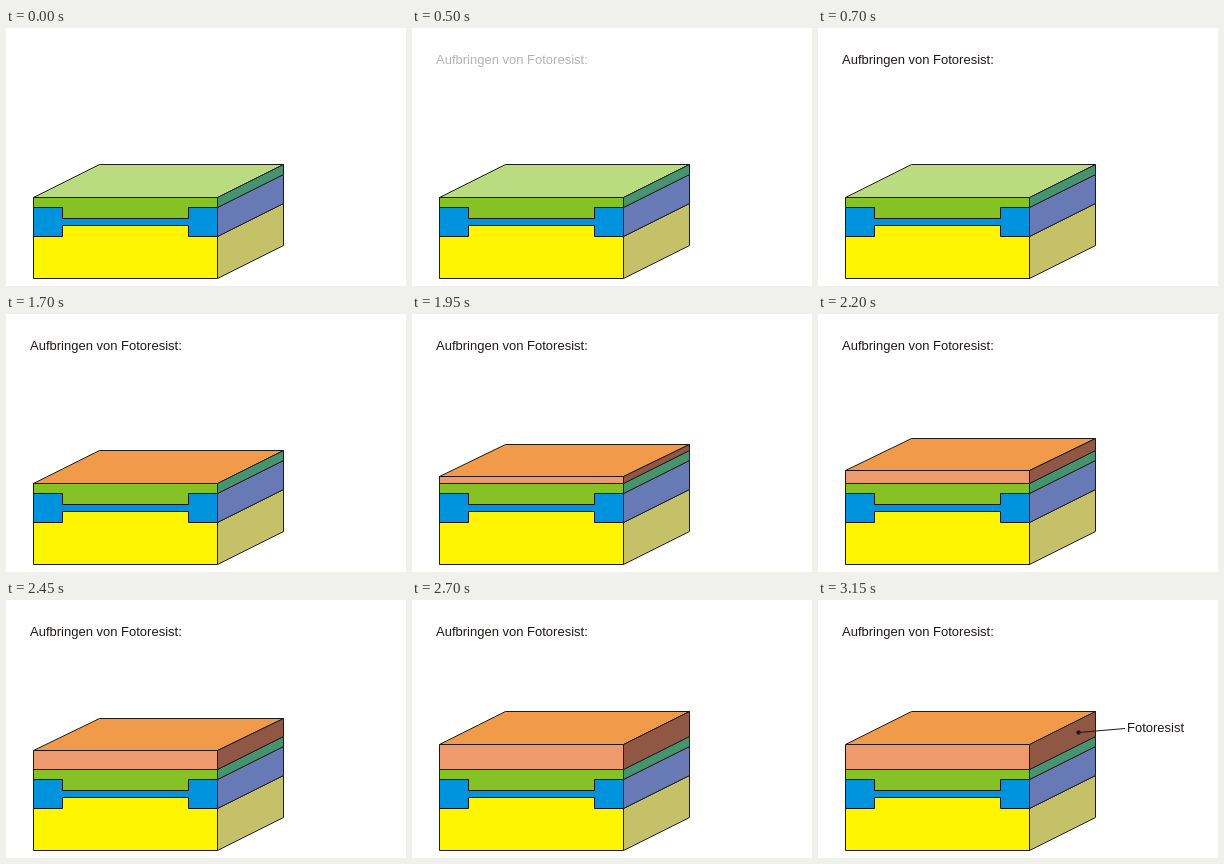
Animation, 400 px wide and 258 px high, one loop 5150 ms. Source, as an HTML page with a canvas:

```html
<!DOCTYPE html>
<html lang="de">
<head>
<meta charset="utf-8">
<title>Aufbringen von Fotoresist</title>
<style>
  html, body { margin: 0; width: 100%; height: 100%; overflow: hidden; background: #fff; }
  canvas { display: block; width: 400px; height: 258px; }
</style>
</head>
<body>
<canvas id="stage" width="400" height="258"></canvas>
<script>
const ctx = document.getElementById('stage').getContext('2d');
const LOOP = 5150;
const INK = '#1f1a17';
const LEFT = 27, RIGHT = 211, BACK_LEFT = 93, BACK_RIGHT = 277;

// Height of the top face's front and back edges as the resist grows
const FRONT_TOP = [169, 162, 156, 150, 144];
const BACK_TOP = [136, 130, 124, 118, 111];

function polygon(fill, ...points) {
  ctx.beginPath();
  for (const [x, y] of points) ctx.lineTo(x + 0.5, y + 0.5);
  ctx.closePath();
  ctx.fillStyle = fill;
  ctx.fill();
  ctx.stroke();
}

function frontFace(fill, top, bottom) {
  polygon(fill, [LEFT, top], [RIGHT, top], [RIGHT, bottom], [LEFT, bottom]);
}

function sideFace(fill, top, bottom, backTop, backBottom) {
  polygon(fill, [RIGHT, top], [BACK_RIGHT, backTop], [BACK_RIGHT, backBottom], [RIGHT, bottom]);
}

function drawBlock(level, coated) {
  const front = FRONT_TOP[level], back = BACK_TOP[level];
  ctx.strokeStyle = INK;
  ctx.lineWidth = 1;
  ctx.lineJoin = 'round';

  polygon(coated ? '#f09a4a' : '#badb7f',
    [LEFT, front], [BACK_LEFT, back], [BACK_RIGHT, back], [RIGHT, front]);

  sideFace('#c5c168', 208, 250, 175, 217);
  sideFace('#677ab5', 179, 208, 146, 175);
  sideFace('#45936f', 169, 179, 136, 146);

  frontFace('#fff500', 169, 250);
  polygon('#84c225', [LEFT, 169], [RIGHT, 169], [RIGHT, 179], [182, 179],
    [182, 190], [56, 190], [56, 179], [LEFT, 179]);
  polygon('#0093dd', [LEFT, 179], [56, 179], [56, 190], [182, 190], [182, 179], [RIGHT, 179],
    [RIGHT, 208], [182, 208], [182, 197], [56, 197], [56, 208], [LEFT, 208]);

  if (level > 0) {
    frontFace('#ee9a6c', front, 169);
    sideFace('#905844', front, 169, back, 136);
  }
}

function drawText(text, x, y) {
  ctx.font = '13px "Liberation Sans", Arial, sans-serif';
  ctx.fillStyle = INK;
  ctx.fillText(text, x, y);
}

function drawCallout() {
  ctx.beginPath();
  ctx.moveTo(260.5, 132.5);
  ctx.lineTo(307, 128.5);
  ctx.stroke();
  ctx.beginPath();
  ctx.arc(260.5, 132.5, 2.2, 0, Math.PI * 2);
  ctx.fillStyle = INK;
  ctx.fill();
  drawText('Fotoresist', 309, 132);
}

// Number of whole steps reached since start, limited to max
function steps(t, start, interval, max) {
  return Math.max(0, Math.min(max, Math.floor((t - start) / interval) + 1));
}

function render(t) {
  ctx.globalAlpha = 1;
  ctx.fillStyle = '#fff';
  ctx.fillRect(0, 0, 400, 258);
  drawBlock(steps(t, 1950, 250, 4), t >= 1700);

  ctx.globalAlpha = steps(t, 500, 100, 3) / 3;
  drawText('Aufbringen von Fotoresist:', 24, 36);

  ctx.globalAlpha = steps(t, 2950, 100, 3) / 3;
  drawCallout();
}

const startTime = performance.now();
function tick() {
  render((performance.now() - startTime) % LOOP);
  requestAnimationFrame(tick);
}
tick();
</script>
</body>
</html>
```
